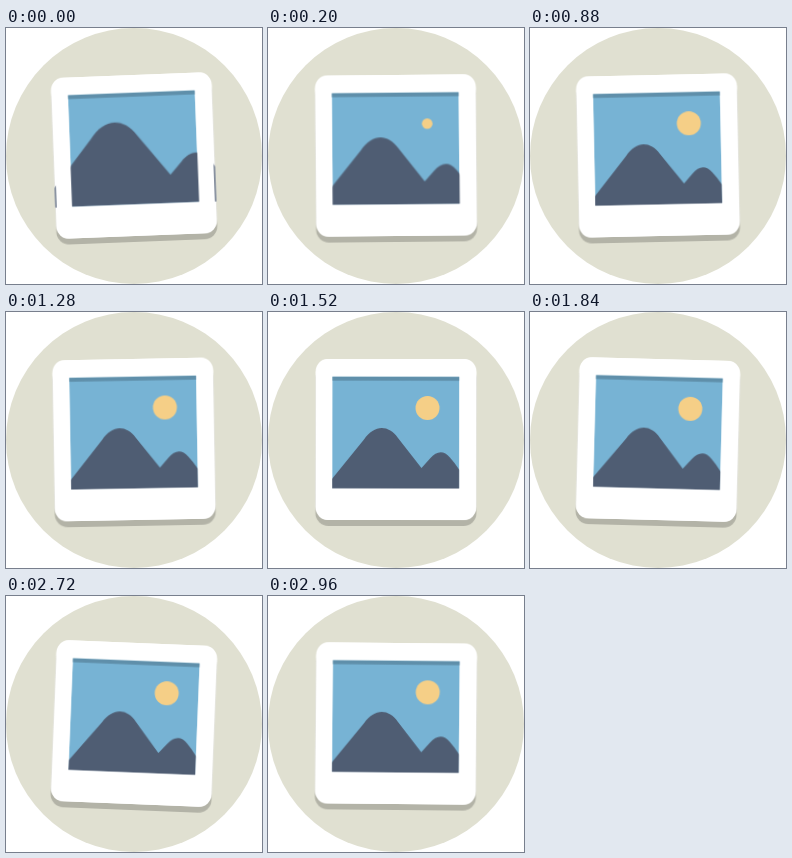
Recreate the animation shown at these times as an HTML page without scripts. Size 256x256 px, loop 3 s.

```html
<!DOCTYPE html>
<html lang="en">
<head>
<meta charset="utf-8">
<title>Swinging picture</title>
<style>
html, body { margin: 0; width: 100%; height: 100%; overflow: hidden; background: #fff; }
svg { display: block; width: 100vw; height: 100vh; }

.card, .hills, .sun { animation: 3s linear infinite; }
.card { transform-origin: 128px 128px; animation-name: swing; }
.hills { transform-origin: 125px 178px; animation-name: settle; }
.sun { transform-origin: 159.5px 96px; animation-name: pop; }

@keyframes swing {
  0% { transform: rotate(-2.2deg); animation-timing-function: ease-in-out; }
  16% { transform: rotate(2.5deg); }
  20% { transform: rotate(1.2deg); }
  29.33% { transform: rotate(-1.2deg); animation-timing-function: ease-out; }
  36% { transform: rotate(-1.4deg); animation-timing-function: ease-in; }
  42.67% { transform: rotate(-1deg); }
  61.33% { transform: rotate(1.5deg); }
  77.33% { transform: rotate(2.5deg); animation-timing-function: ease-out; }
  84% { transform: rotate(2.7deg); animation-timing-function: ease-in; }
  93.33% { transform: rotate(2deg); }
  98.67%, 100% { transform: rotate(.5deg); }
}
@keyframes settle {
  0% { transform: scale(1.36); animation-timing-function: ease-out; }
  13%, 100% { transform: none; }
}
@keyframes pop {
  0%, 4% { transform: scale(0); animation-timing-function: ease-out; }
  14.5%, 16% { transform: scale(1.14); animation-timing-function: ease-in-out; }
  21%, 100% { transform: none; }
}
</style>
</head>
<body>
<svg viewBox="0 0 256 256">
  <defs>
    <rect id="plate" x="47.5" y="47" width="161" height="161" rx="13"/>
    <clipPath id="edge"><use href="#plate"/></clipPath>
  </defs>
  <circle cx="128" cy="128" r="128" fill="#e0e0d1"/>
  <g class="card">
    <use href="#plate" y="6" fill="#b3b3a7"/>
    <use href="#plate" fill="#fff"/>
    <rect x="64.2" y="64.5" width="127.2" height="112" fill="#77b3d4"/>
    <circle class="sun" cx="159.5" cy="96" r="12" fill="#f5cf87"/>
    <g clip-path="url(#edge)">
      <path class="hills" fill="#4f5d73" d="M64 177V167L96 127.5C106 113 120 112 130 126L153.5 156L162 146.5C169 138.500 176 138.500 182 145.500Q187 151 191.500 158V177Z"/>
    </g>
    <rect x="64.2" y="64.5" width="127.2" height="4.2" fill="#5f8faa"/>
    <!-- Frame over the hills, slightly inset at the sides -->
    <path fill="#fff" fill-rule="evenodd" d="M61 47H195Q207.300 47 207.300 60V195Q207.300 208 195 208H61Q48.700 208 48.700 195V60Q48.700 47 61 47ZM64.200 64.500V176.500H191.400V64.500Z"/>
  </g>
</svg>
</body>
</html>
```
